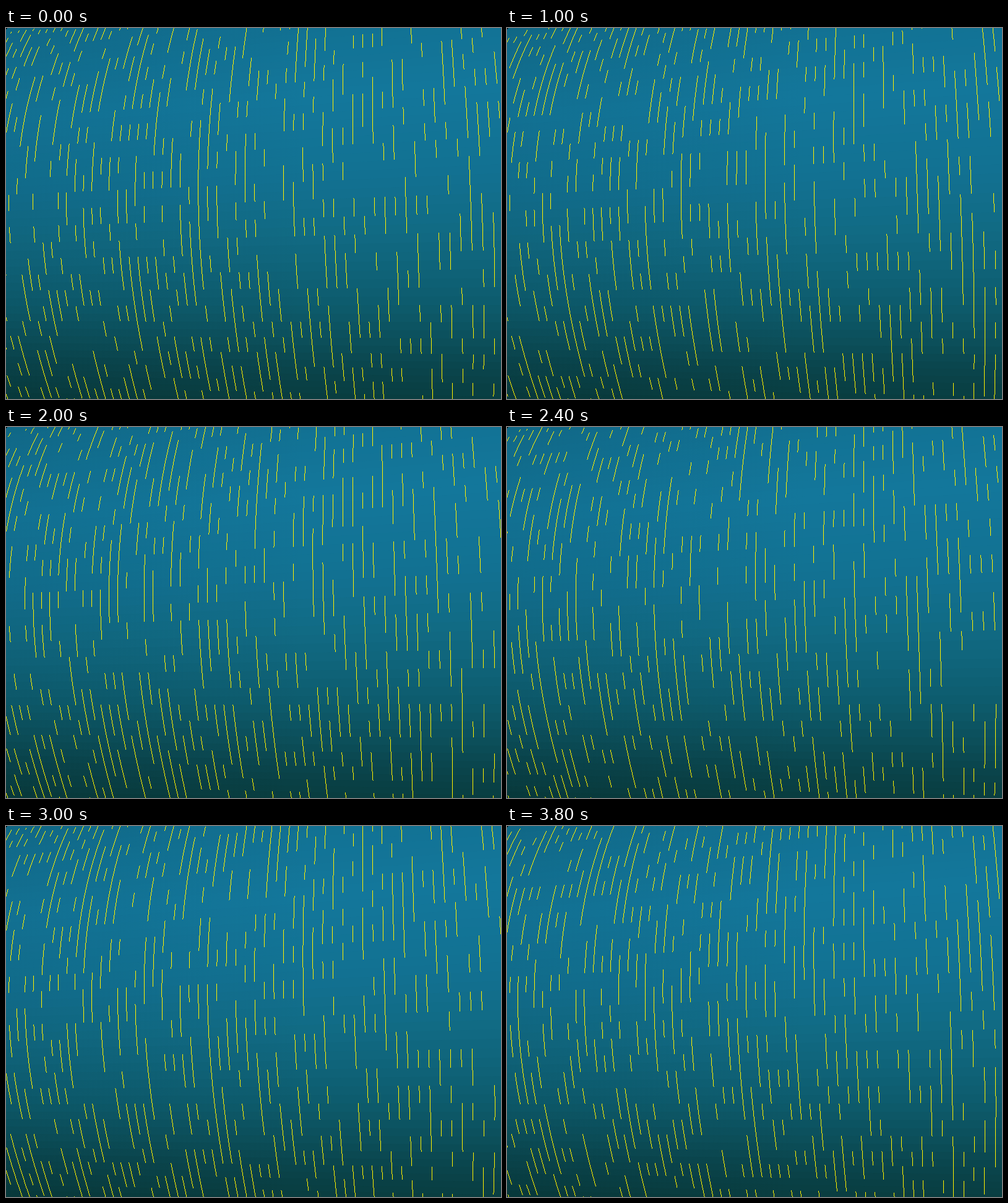
Recreate the animation shown at these times as an HTML page with a canvas. Size 800x600 px, loop 4000 ms.

```html
<!DOCTYPE html>
<html lang="en">
<head>
<meta charset="utf-8">
<title>Curved dashes</title>
<style>
  html, body { margin: 0; width: 100%; height: 100%; overflow: hidden; background: #0c5262; }
  canvas { display: block; width: 800px; height: 600px; }
</style>
</head>
<body>
<canvas id="stage" width="800" height="600"></canvas>
<script>
const ctx = document.getElementById('stage').getContext('2d');
const STEP = 200, STEPS = 20;
const ROW_MIN = -15, ROW_MAX = 16, COL_MIN = -10, COL_MAX = 53;

// Surface tone by row: [row, r, g, b]
const tones = [
  [-15, 17, 108, 140], [-10, 18, 113, 147], [-5, 19, 119, 155],
  [0, 18, 113, 145], [3, 17, 106, 131], [5, 15, 99, 121],
  [7, 13, 91, 108], [9, 12, 80, 92], [11, 10, 69, 76], [14, 8, 58, 60]
];

function tone(row) {
  let k = 1;
  while (k < tones.length - 1 && row > tones[k][0]) k++;
  const a = tones[k - 1], b = tones[k];
  const u = Math.min(1, (row - a[0]) / (b[0] - a[0]));
  const mix = n => Math.round(a[n] + (b[n] - a[n]) * u);
  return `rgb(${mix(1)},${mix(2)},${mix(3)})`;
}

// Height of a row boundary, blended between the left and right edge
function rowY(m, x) {
  const n = Math.abs(m) ** 3;
  const left = 270 + 26 * m + (m < 0 ? 0.035 * n : -0.00095 * m * n);
  const right = 235 + (m < 0 ? 29.5 * m + 0.03 * n : 31.5 * m - 0.022 * n);
  return left + (right - left) * x / 790;
}

const colBase = i => 4 + 13.03 * i + 0.037 * i * i + 0.00016 * i ** 3;

// Horizontal place of a column at a given height
function colX(i, y) {
  const d = y - 270;
  const fade = Math.max(0, 1 - i / 30);
  let x = colBase(i) + (0.00105 * i - 0.015) * d + (0.00066 - 0.000015 * i) * d * d;
  x -= 2.5e-7 * fade * d ** 3;
  if (d < 0) x += 1.2e-9 * fade * d ** 4;
  return x;
}

function random(seed) {
  return () => {
    seed = (seed + 0x6D2B79F5) | 0;
    let t = Math.imul(seed ^ (seed >>> 15), 1 | seed);
    t = (t + Math.imul(t ^ (t >>> 7), 61 | t)) ^ t;
    return ((t ^ (t >>> 14)) >>> 0) / 4294967296;
  };
}

function drawSurface() {
  ctx.fillStyle = tone(ROW_MIN);
  ctx.fillRect(0, 0, 800, 600);
  for (let m = ROW_MIN; m < ROW_MAX; m += 0.5) {
    ctx.fillStyle = tone(m + 0.25);
    ctx.beginPath();
    ctx.moveTo(0, rowY(m, 0));
    ctx.lineTo(800, rowY(m, 800));
    ctx.lineTo(800, 600);
    ctx.lineTo(0, 600);
    ctx.fill();
  }
  const shade = ctx.createLinearGradient(0, 0, 500, 0);
  shade.addColorStop(0, 'rgba(0,30,36,0.08)');
  shade.addColorStop(1, 'rgba(0,30,36,0)');
  ctx.fillStyle = shade;
  ctx.fillRect(0, 0, 800, 600);
  ctx.fillStyle = '#000';
  ctx.fillRect(0, 0, 2, 1);
  ctx.fillRect(0, 1, 1, 1);
}

// One-pixel stroke without smoothing, drawn as upright runs
function drawDash(i, y0, y1) {
  let y = Math.round(y0);
  const end = Math.round(y1);
  while (y < end) {
    const x = Math.round(colX(i, y));
    let next = y + 1;
    while (next < end && Math.round(colX(i, next)) === x) next++;
    ctx.fillRect(x, y, 1, next - y);
    y = next;
  }
}

function draw(step) {
  drawSurface();
  ctx.fillStyle = '#fff000';
  const rnd = random(step * 7919 + 17);
  for (let i = COL_MIN; i <= COL_MAX; i++) {
    const base = colBase(i);
    for (let m = ROW_MIN; m < ROW_MAX; m++) {
      if (rnd() < 0.5) drawDash(i, rowY(m, base), rowY(m + 1, base));
    }
  }
}

let shown = -1;
function tick() {
  const step = Math.floor(performance.now() / STEP) % STEPS;
  if (step !== shown) draw(shown = step);
  requestAnimationFrame(tick);
}
tick();
</script>
</body>
</html>
```
